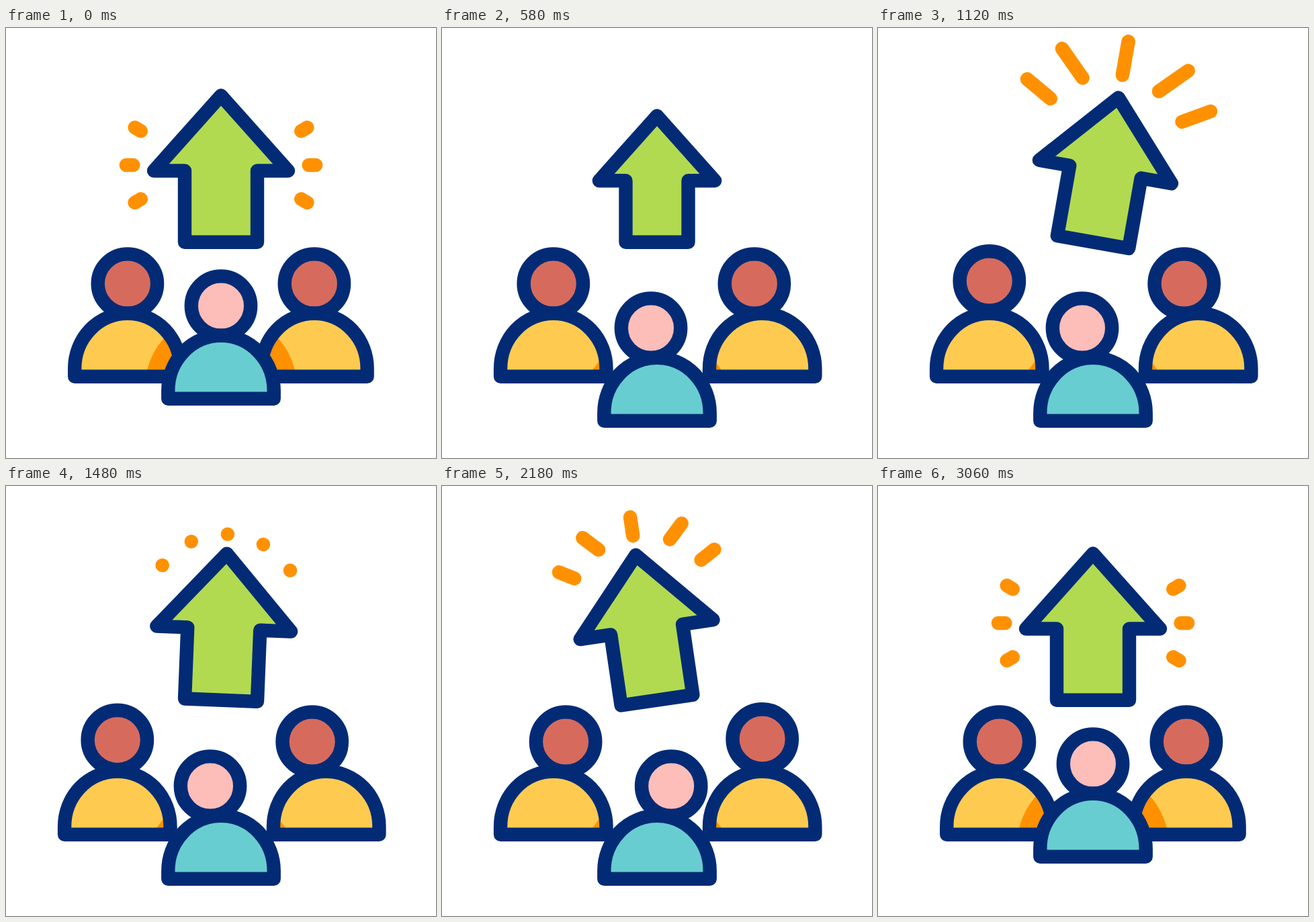
An HTML page for the animation above (3.4 s loop, 640 px wide and 640 px high).

```html
<!DOCTYPE html>
<html lang="en">
<head>
<meta charset="utf-8">
<title>Team growth</title>
<style>
  html, body { margin: 0; width: 100%; height: 100%; overflow: hidden; background: #fff; }
  svg { display: block; width: 100vw; height: 100vh; }
  .ink { stroke: #032b75; stroke-width: 20.4; stroke-linejoin: round; }
  .ray { stroke: #ff9100; stroke-width: 20.6; stroke-linecap: round; }
</style>
</head>
<body>
<svg id="stage" viewBox="0 0 640 640"></svg>
<script>
const LOOP = 3400, STEP = 20, MID = 320;
const stage = document.getElementById('stage');

function set(el, attrs) {
  for (const k in attrs) el.setAttribute(k, attrs[k]);
}
function add(parent, tag, attrs = {}) {
  const el = document.createElementNS('http://www.w3.org/2000/svg', tag);
  set(el, attrs);
  return parent.appendChild(el);
}
const move = (el, x, y) => set(el, { transform: `translate(${x} ${y})` });

// Eased progress 0..1 of t between a and b
function part(t, a, b) {
  const p = Math.min(1, Math.max(0, (t - a) / (b - a)));
  return (1 - Math.cos(Math.PI * p)) / 2;
}

// Repeated nod of a head, up and back
function nod(t, start, count, period = 400) {
  const turn = (t - start) / period;
  return turn < 0 || turn > count ? 0 : -2.6 * (1 - Math.cos(2 * Math.PI * turn));
}

// A line from a point along an angle, 0 pointing up
function ray(parent, x, y, angle, length) {
  const a = angle * Math.PI / 180;
  return {
    el: add(parent, 'line', { class: 'ray' }),
    x, y, dx: Math.sin(a) * length, dy: -Math.cos(a) * length
  };
}

// Shows the stretch from..to of a ray; a zero length stays a round dot
function trim({ el, x, y, dx, dy }, from, to, shown) {
  set(el, {
    x1: x + dx * from, y1: y + dy * from,
    x2: x + dx * to + .01, y2: y + dy * to,
    visibility: shown ? 'visible' : 'hidden'
  });
}

const dashes = [];
for (const side of [-1, 1])
  for (const row of [-1, 0, 1])
    dashes.push(ray(stage, MID + side * (130.7 - 11.4 * Math.abs(row)),
      204 + 50.6 * row, side * (90 + 30 * row), 10.4));

const arrowBox = add(stage, 'g');
const rays = [-2, -1, 0, 1, 2].map(i => {
  const n = Math.abs(i);
  const a = 12.9 * i * Math.PI / 180, r = 247.2 - 7.1 * n * n;
  return ray(arrowBox, r * Math.sin(a), -r * Math.cos(a),
    90 * i / (n + 1), 56 + 9 * n - 6 * n * n);
});

const half = [[0, -218.2], [100, -106.2], [54, -106.2], [54, 0]];
const outline = [...half, ...half.slice(1).reverse().map(([x, y]) => [-x, y])];
const arrow = add(arrowBox, 'polygon', { class: 'ink', fill: '#b1da51' });

const BODY = 'M-78.7 518.7V506.8A78.7 82 0 0 1 78.7 506.8V518.7Z';
add(add(stage, 'clipPath', { id: 'body' }), 'path', { d: BODY });

function person(skin, shirt) {
  const g = add(stage, 'g');
  const head = add(g, 'circle', { class: 'ink', cy: 380.6, r: 44.2, fill: skin });
  add(g, 'path', { d: BODY, fill: shirt });
  const shade = add(add(g, 'g', { 'clip-path': 'url(#body)' }),
    'circle', { fill: '#ff9100' });
  add(g, 'path', { class: 'ink', d: BODY, fill: 'none' });
  return { g, head, shade };
}
const left = person('#d66b5d', '#fecb50');
const right = person('#d66b5d', '#fecb50');
const front = person('#fdbdb9', '#68cdd1');

function place(p, x, y, headX, headY) {
  move(p.g, x, y);
  move(p.head, headX, headY);
}

function draw(t) {
  const home = part(t, 2680, 3050);
  const spread = part(t, 0, 340) - home;
  const lean = part(t, 440, 700);

  // People step apart, then look to one side and the other
  const drop = 33 + 33 * spread;
  const leftX = 180.9 - 15.1 * spread, rightX = 458.9 + 17.8 * spread;
  place(left, leftX, 0, 18.3 * (part(t, 1560, 1780) - home), nod(t, 580, 3));
  place(right, rightX, 0,
    -21 * lean + 24.5 * part(t, 1490, 1600) - 3.5 * part(t, 1600, 1680), nod(t, 1640, 2));
  place(front, MID, drop, -16 * lean + 37.2 * part(t, 1510, 1760) - 21.2 * home, 0);

  // Shade of the front person on the two behind
  set(left.shade, { cx: MID - leftX, cy: 503.5 + drop, r: 113.3 });
  set(right.shade, { cx: MID - rightX, cy: 503.5 + drop, r: 113.3 });

  const scale = 1 - .392 * part(t, 0, 380) + .432 * part(t, 380, 740) - .04 * part(t, 740, 900);
  const tilt = 10 * part(t, 880, 1110) - 21.7 * part(t, 1110, 2020) + 11.7 * part(t, 2020, 2464);
  set(arrowBox, { transform: `translate(${MID} 318.7) rotate(${tilt})` });
  set(arrow, { points: outline.map(p => p.map(c => c * scale)).join(' ') });

  const out = part(t, 0, 200), back = part(t, 2840, 3060);
  for (const d of dashes) trim(d, back ? 0 : out, back || 1, out < 1 || back > 0);

  // Three bursts, 600 ms apart, grow and then leave outwards
  const age = (t - 880) % 600;
  const bursting = t >= 880 && t < 2680 && age < 400;
  for (const r of rays) trim(r, part(age, 200, 400), part(age, 0, 200), bursting);
}

const begin = performance.now();
function tick() {
  const t = (performance.now() - begin) % LOOP;
  draw(Math.floor(t / STEP) * STEP);
  requestAnimationFrame(tick);
}
tick();
</script>
</body>
</html>
```
